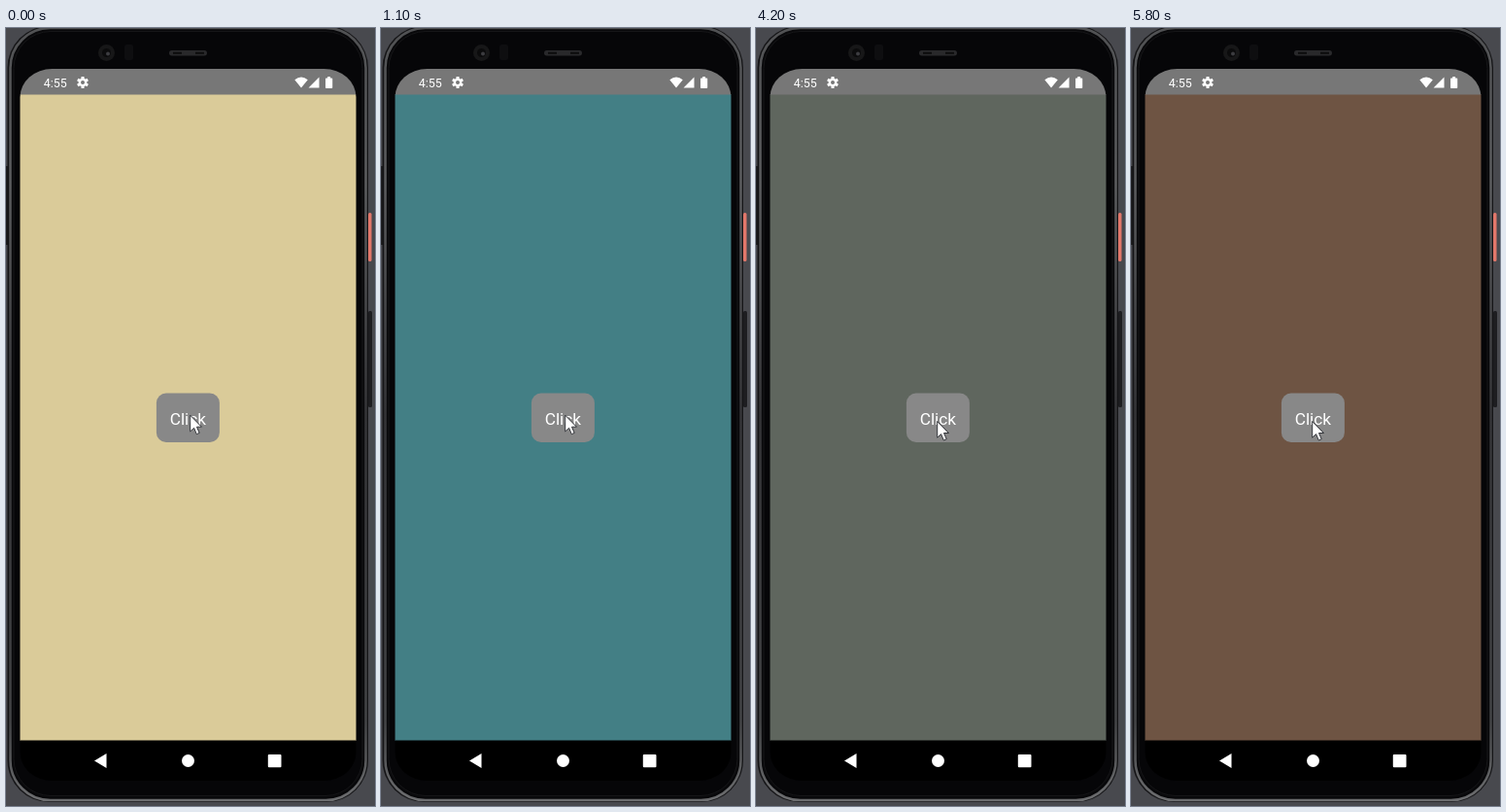
Write an HTML page that moves like this. It is 380 by 800 pixels and loops after 6200 ms.

```html
<!DOCTYPE html>
<html lang="en">
<head>
<meta charset="utf-8">
<title>Colour button</title>
<style>
html, body { margin: 0; width: 100%; height: 100%; overflow: hidden; background: #48494e; }
svg { display: block; }
text { font-family: Roboto, sans-serif; fill: #fff; }
</style>
</head>
<body>
<svg width="380" height="800" viewBox="0 0 380 800">
  <defs>
    <linearGradient id="rim" x2="0" y2="1">
      <stop offset="0" stop-color="#505153"/>
      <stop offset=".2" stop-color="#5c5d5f"/>
      <stop offset=".5" stop-color="#343437"/>
      <stop offset=".9" stop-color="#434446"/>
      <stop offset="1" stop-color="#6c6d6f"/>
    </linearGradient>
    <clipPath id="screen"><rect x="14.5" y="42" width="346" height="732" rx="33" ry="29"/></clipPath>
  </defs>

  <!-- phone body -->
  <rect width="380" height="800" fill="#48494e"/>
  <path d="M0 142h3v81H0z" fill="#1b1b1d"/>
  <rect x="373" y="291" width="4" height="99" rx="1.5" fill="#1d1d20"/>
  <rect x="373" y="190" width="3.5" height="50" rx="1.5" fill="#e2776a"/>
  <rect x="1.5" y="-2" width="371.5" height="798" rx="43" fill="#151517"/>
  <rect x="4.5" y="0" width="366" height="794" rx="41" fill="#08080a" stroke="url(#rim)" stroke-width="2.5"/>
  <rect x="8" y="3.5" width="359" height="786" rx="38" fill="#060608" stroke="#161618"/>

  <!-- camera, sensor, speaker -->
  <circle cx="103.5" cy="25.5" r="8.5" fill="#171718"/>
  <circle cx="103.5" cy="25.5" r="4.5" fill="#0b0b0c"/>
  <circle cx="105" cy="26.5" r="2" fill="#3c3c40"/>
  <rect x="122" y="17" width="9" height="16" rx="2" fill="#0e0e10"/>
  <rect x="168" y="23" width="39" height="5.5" rx="2.7" fill="#29292b"/>
  <path d="M172 25.7h9M195 25.7h9" stroke="#0c0c0d" stroke-width="2"/>

  <!-- screen -->
  <g clip-path="url(#screen)">
    <rect id="page" x="14" y="68" width="347" height="665"/>
    <rect x="14" y="42" width="347" height="26.5" fill="#777"/>
    <rect x="14" y="732.5" width="347" height="42"/>
  </g>
  <text x="38.8" y="61" font-size="12.4">4:55</text>
  <g fill="#fff">
    <g id="gear" transform="translate(79 56)"><circle r="3.2" fill="none" stroke="#fff" stroke-width="2.4"/></g>
    <path d="M297.3 53.2Q304 47.8 310.8 53.2L304 61.5zM322.5 50.5v11h-11z"/>
    <path d="M329 52.3q0-.8.8-.8h1.4V50h2.8v1.5h1.4q.8 0 .8.8v8.9q0 .8-.8.8h-5.6q-.8 0-.8-.8z"/>
    <path d="M91 753.5l12.5-7.5v15z"/>
    <circle cx="187.5" cy="753.5" r="6.5"/>
    <rect x="269.8" y="747" width="13.7" height="13.2" rx="1"/>
  </g>

  <g id="button">
    <rect x="154.9" y="375.5" width="65" height="50.5" rx="10" fill="#888"/>
    <text x="187.4" y="407.7" font-size="17.3" text-anchor="middle">Click</text>
  </g>
  <path id="cursor" d="M.4.5V17.2L4.3 13.6 7 20 9.9 18.7 7.2 12.5H12.2z" fill="#fff" stroke="#33353a" stroke-width="1" stroke-linejoin="round"/>
</svg>
<script>
const $ = id => document.getElementById(id);
const LOOP = 6200, STEP = 100;

for (let a = 0; a < 360; a += 60)
  $('gear').insertAdjacentHTML('beforeend', `<rect x="-1.5" y="-6" width="3" height="3" transform="rotate(${a})"/>`);

// each tap: pressed, released, page colour from the release on
const taps = [
  [300, 400, '#a261c8'], [1000, 1100, '#437f85'], [4000, 4200, '#5f665e'],
  [4900, 5100, '#78a89c'], [5700, 5800, '#6e5443']
];

// [time, x, y]: pointer moves in straight runs between these
const path = [
  [0, 189.3, 397.7], [1600, 189.3, 397.7], [1800, 62, 615], [1900, 22, 667], [2000, 122, 584],
  [2400, 122, 584], [2800, 214, 450], [2900, 217, 424], [3100, 209, 399],
  [3400, 188, 403.5], [3500, 186.3, 404], [LOOP, 186.3, 404]
];

function pointer(t) {
  const i = path.findIndex(p => p[0] > t);
  const [t0, x0, y0] = path[i - 1], [t1, x1, y1] = path[i];
  const k = (t - t0) / (t1 - t0);
  return [x0 + (x1 - x0) * k, y0 + (y1 - y0) * k];
}

function draw(now) {
  const t = Math.floor(now % LOOP / STEP) * STEP;
  const done = taps.filter(([, up]) => up <= t).pop();
  const pressed = taps.some(([down, up]) => down <= t && t < up);
  $('page').setAttribute('fill', done ? done[2] : '#dacb99');
  $('button').setAttribute('opacity', pressed ? .5 : 1);
  $('cursor').setAttribute('transform', `translate(${pointer(t)})`);
}

let start;
function frame(now) {
  start ??= now;
  draw(now - start);
  requestAnimationFrame(frame);
}
draw(0);
requestAnimationFrame(frame);
</script>
</body>
</html>
```
